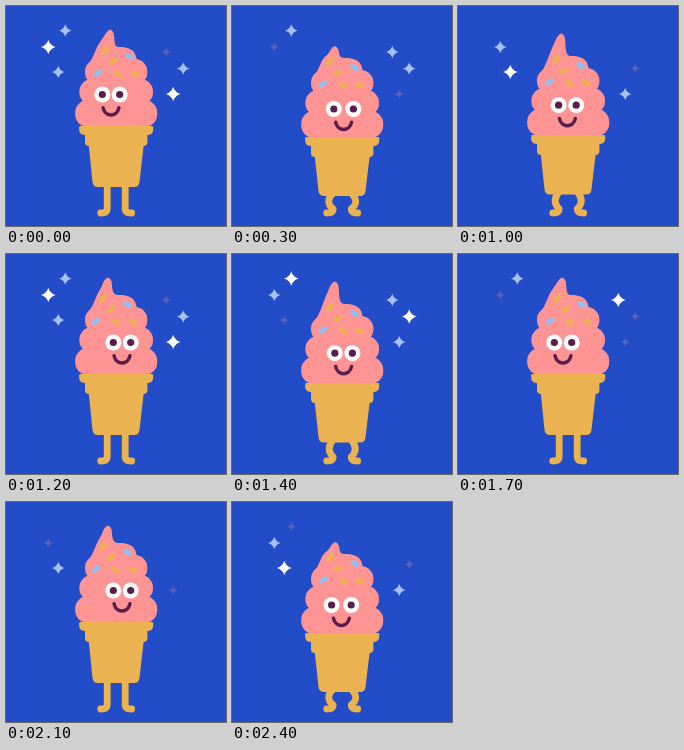
An HTML page with a canvas that plays this animation: 220x220 px, repeating every 2.6 s.

```html
<!DOCTYPE html>
<html lang="en">
<head>
<meta charset="utf-8">
<title>Dancing ice cream</title>
<style>
html, body { margin: 0; width: 100%; height: 100%; overflow: hidden; background: #224cc8; }
canvas { display: block; width: 220px; height: 220px; }
</style>
</head>
<body>
<canvas id="stage" width="220" height="220"></canvas>
<script>
const ctx = document.getElementById('stage').getContext('2d');
const BLUE = '#224cc8', PINK = '#ff9494', CONE = '#ebb252', DARK = '#5a1e4c', SKY = '#8fc1f5';
const CENTER = 110.2;

// Four poses of one bounce; y values are on the stage, lean is the share of the sideways turn.
const poses = [
  { base: 120, tip: 23, face: 88.5, eyes: 8.7, foot: 181, knee: 0, lean: 1 },
  { base: 118, tip: 20, face: 87.5, eyes: 8.7, foot: 180, knee: 0, lean: 0.8 },
  { base: 129, tip: 27, face: 99.2, eyes: 8.8, foot: 188.5, knee: 4, lean: 0.2 },
  { base: 131, tip: 39.5, face: 103, eyes: 9.8, foot: 190, knee: 4.5, lean: -0.2 }
];

// x, y, step of greatest brightness
const stars = [
  [42.3, 41, 0], [59.3, 24.5, 2.3], [52.3, 66, 10.4],
  [160.3, 46, 3.8], [177.2, 62.5, 1.5], [167.2, 88, 0]
];

// Twinkle levels by distance from the brightest step
const glows = [
  { within: 0.65, r: 7.3, color: '#fff' },
  { within: 2.45, r: 6.3, color: '#a6c0f0' },
  { within: 4.1, r: 4.6, color: '#5561bb' }
];

// x, y relative to the cream's base, angle, colour
const sprinkles = [
  [98, -75.5, -0.9, CONE], [106, -64.5, -0.5, CONE], [122.7, -69.5, 0.5, SKY],
  [91, -53, -0.6, SKY], [111, -52, 0.6, CONE], [128, -52, 0.4, CONE]
];

function fill(path, color) {
  ctx.fillStyle = color;
  ctx.fill(new Path2D(path));
}

function stroke(path, color, width) {
  ctx.strokeStyle = color;
  ctx.lineWidth = width;
  ctx.lineCap = ctx.lineJoin = 'round';
  ctx.stroke(new Path2D(path));
}

function box(half, top, height, radius, color) {
  ctx.fillStyle = color;
  ctx.beginPath();
  ctx.roundRect(CENTER - half, top, half * 2, height, radius);
  ctx.fill();
}

function disc(x, y, r, color) {
  ctx.fillStyle = color;
  ctx.beginPath();
  ctx.arc(x, y, r, 0, Math.PI * 2);
  ctx.fill();
}

function star([x, y, peak], step) {
  const gap = Math.abs(step - peak) % 12;
  const glow = glows.find(g => Math.min(gap, 12 - gap) < g.within);
  if (!glow) return;
  const r = glow.r, c = r * 0.22;
  fill(`M${x} ${y - r}Q${x + c} ${y - c} ${x + r} ${y}Q${x + c} ${y + c} ${x} ${y + r}
    Q${x - c} ${y + c} ${x - r} ${y}Q${x - c} ${y - c} ${x} ${y - r}Z`, glow.color);
}

function legs({ foot, knee }) {
  for (const side of [-1, 1]) {
    const x = CENTER + side * 9;
    stroke(`M${x} ${foot - 3}Q${x + side * knee * 2} ${(foot + 202) / 2} ${x} 203
      Q${x} 207 ${x + side * 6.5} 207`, CONE, 6.8);
  }
}

function cone({ base, foot }) {
  const top = base + 12;
  fill(`M82 ${top}H138.5L133.5 ${foot - 5}Q133 ${foot} 128 ${foot}H92
    Q87 ${foot} 86.5 ${foot - 5}Z`, CONE);
  box(31.2, base + 4, 16, 4, CONE);
  box(37, base, 9, [1, 1, 5, 5], CONE);
}

function cream({ base, tip }, sway) {
  const at = y => base + y;
  box(41, at(-26), 27, 12.5, PINK);
  box(36.8, at(-47), 26, 12.5, PINK);
  box(31.2, at(-67), 26, 12.5, PINK);
  const x = 103 + sway;
  fill(`M${x - 4} ${tip + 4}Q${x + 0.5} ${tip - 3} ${x + 3.5} ${tip + 4}
    C${x + 5} ${(tip + at(-79)) / 2 + 1} ${x + 3} ${at(-79)} 113 ${at(-79)}
    C128 ${at(-79)} 131 ${at(-72)} 131 ${at(-62)}V${at(-52)}H82V${at(-60)}
    Q86 ${at(-67)} 89 ${at(-74)}C92 ${at(-82)} 95 ${tip + 12} ${x - 4} ${tip + 4}Z`, PINK);
  for (const [sx, sy, angle, color] of sprinkles) {
    const dx = Math.cos(angle) * 2.5, dy = Math.sin(angle) * 2.5;
    const px = sx + sway, py = at(sy);
    stroke(`M${px - dx} ${py - dy}L${px + dx} ${py + dy}`, color, 4.6);
  }
}

function face(x, y, eyes) {
  for (const side of [-1, 1]) {
    disc(x + side * eyes, y, 8, '#fff');
    disc(x + side * eyes, y, 3.6, DARK);
  }
  stroke(`M${x - 8} ${y + 13.2}C${x - 6} ${y + 23} ${x + 6} ${y + 23} ${x + 8} ${y + 13.2}`, DARK, 3.4);
}

function draw(now) {
  // The picture moves in 100 ms steps, resting on the 15th and on the last.
  const slot = Math.floor(now % 2600 / 100);
  const step = Math.min(23, slot - (slot > 14));
  const pose = poses[step % 4];
  const side = step % 8 < 4 ? -1 : 1;
  const turn = 5.5 * side * pose.lean;

  ctx.fillStyle = BLUE;
  ctx.fillRect(0, 0, 220, 220);
  stars.forEach(s => star(s, step));
  legs(pose);
  cream(pose, -0.2 * turn);
  cone(pose);
  face(110.5 + turn, pose.face, pose.eyes);
}

const start = performance.now();
function tick() {
  draw(performance.now() - start);
  requestAnimationFrame(tick);
}
tick();
</script>
</body>
</html>
```
